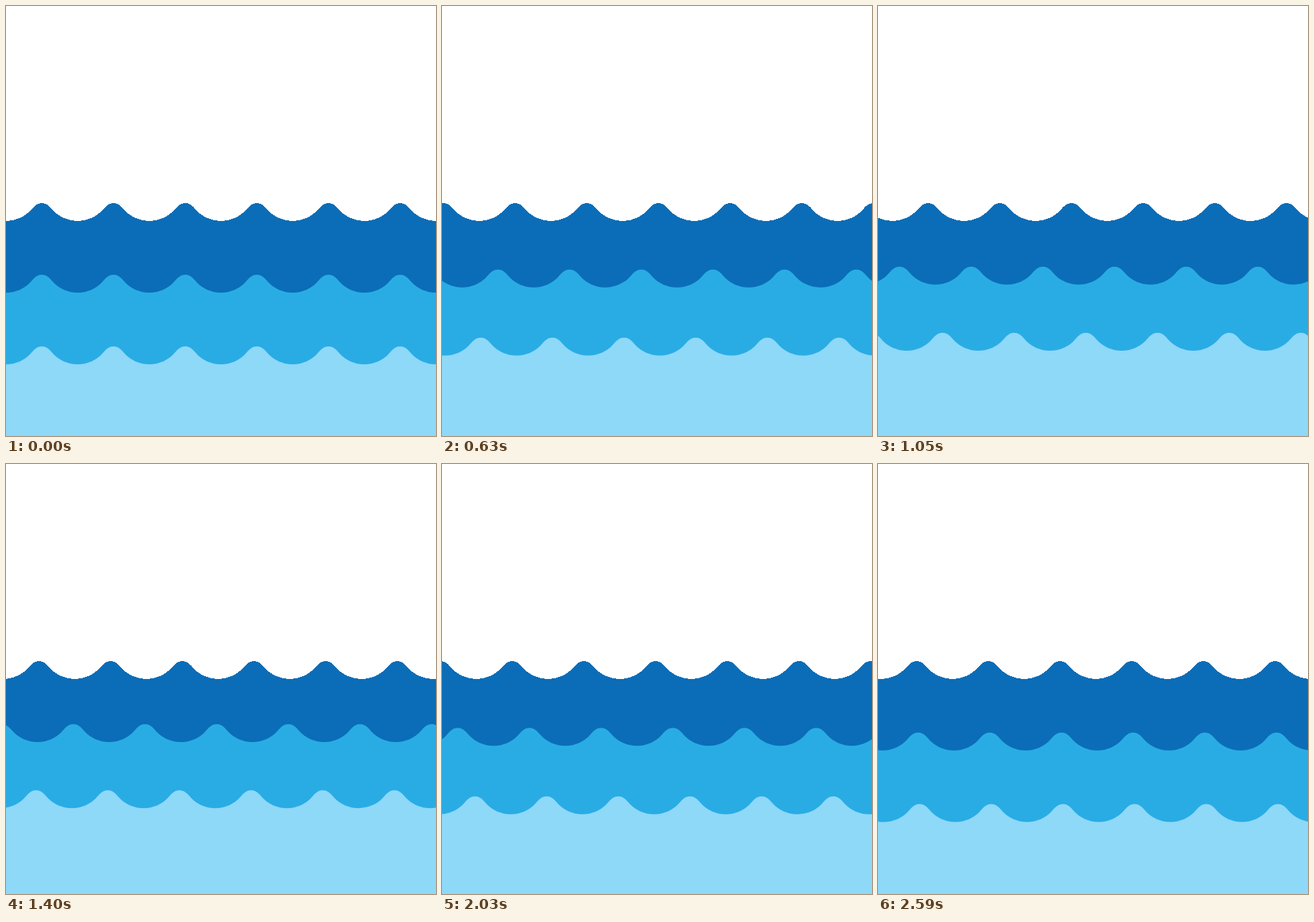
An HTML page for the animation above (2.62 s loop, 600 by 600 pixels).

```html
<!DOCTYPE html>
<html lang="en">
<head>
<meta charset="utf-8">
<title>Waves</title>
<style>
  html, body { margin: 0; width: 100%; height: 100%; overflow: hidden; background: #fff; }
  svg { display: block; width: 100%; height: 100%; }
</style>
</head>
<body>
<svg viewBox="0 0 600 600">
  <path id="back" fill="#0b6db7" shape-rendering="crispEdges"/>
  <path id="middle" fill="#29ace4"/>
  <path id="front" fill="#8ed8f8"/>
</svg>
<script>
const LOOP = 2620, HOLD = 70, POSES = 50, PERIOD = 100;

// top: crest height at rest, speed: px to the left per pose, lift: px upward
const layers = [
  { id: "back", top: 275, speed: 4, lift: 0 },
  { id: "middle", top: 375, speed: 6, lift: 12 },
  { id: "front", top: 475, speed: 8, lift: 20 }
];

// One period, from trough over the crest to the next trough
const ridge =
  "c14 0 26.5 -6.5 33 -13.5 c5 -5.5 9 -11.5 17 -11.5 " +
  "c8 0 12 6 17 11.5 c6.5 7 19 13.5 33 13.5 ";
const outline = "M0 25" + ridge.repeat(8) + "V400H0Z";

for (const layer of layers) {
  layer.el = document.getElementById(layer.id);
  layer.el.setAttribute("d", outline);
}

// Rises and falls once per loop, peaking slightly early
function swell(p) {
  const q = p + 0.012 * Math.sin(Math.PI * p);
  return Math.pow(Math.max(0, Math.sin(Math.PI * q)), 1.4);
}

function draw(ms) {
  const step = Math.floor((ms % LOOP) / HOLD);
  const pose = Math.floor(step * 4 / 3); // every fourth pose is skipped
  const rise = swell(pose / POSES);
  for (const { el, top, speed, lift } of layers) {
    const x = -((pose * speed) % PERIOD);
    el.setAttribute("transform", `translate(${x} ${(top - lift * rise).toFixed(2)})`);
  }
}

const start = performance.now();
function tick(now) {
  draw(Math.max(0, now - start));
  requestAnimationFrame(tick);
}
draw(0);
requestAnimationFrame(tick);
</script>
</body>
</html>
```
